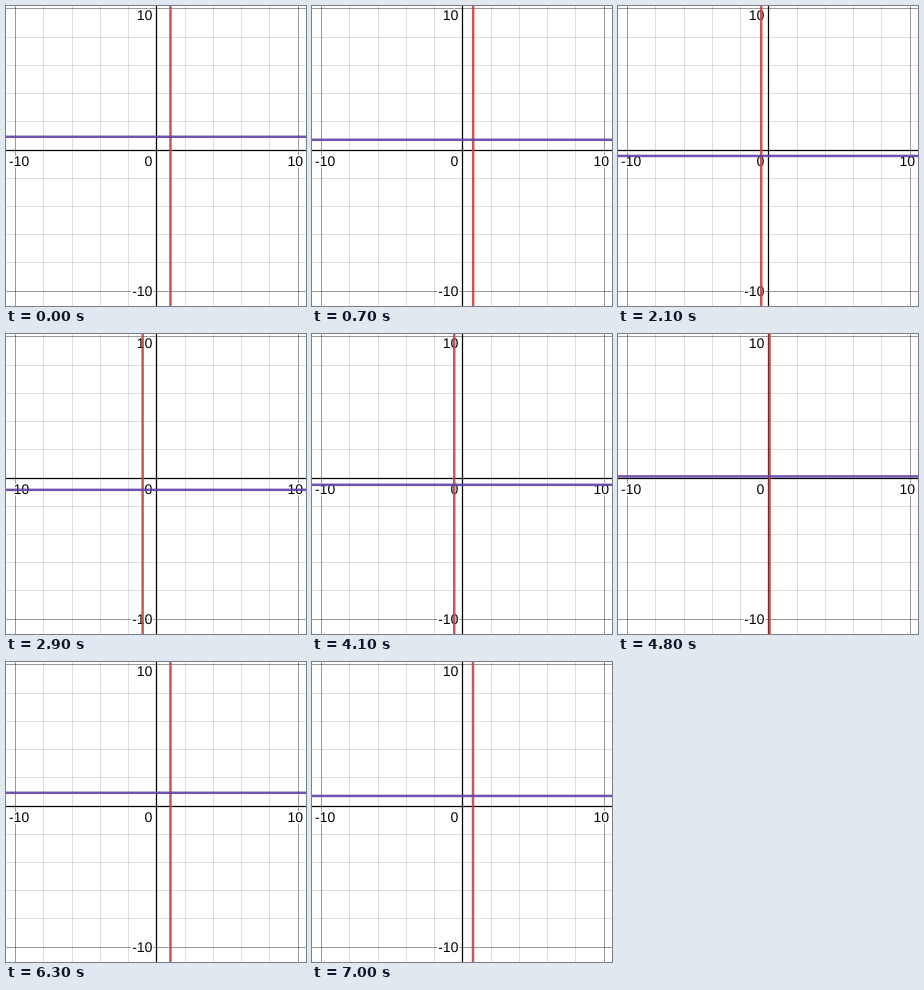
These frames come from a looping animation (300 by 300 pixels, 7100 ms). A matplotlib script:

```python
import math

import matplotlib.pyplot as plt
from matplotlib.animation import FuncAnimation
from matplotlib.patheffects import withStroke

SIZE, DPI = 300, 100
PX = 72 / DPI              # points per pixel
CX, CY, UNIT = 150.35, 143.51, 14.12
FRAMES, INTERVAL = 71, 100

fig = plt.figure(figsize=(SIZE / DPI, SIZE / DPI), dpi=DPI, facecolor="white")
ax = fig.add_axes([0, 0, 1, 1])
ax.set_xlim(0, SIZE)
ax.set_ylim(SIZE, 0)
ax.axis("off")


def rule(x=None, y=None, width=1, **style):
    """Full-length vertical (x) or horizontal (y) line in pixel coordinates."""
    xs = [x, x] if y is None else [-5, SIZE + 5]
    ys = [y, y] if x is None else [-5, SIZE + 5]
    return ax.plot(xs, ys, snap=False, lw=width * PX, **style)[0]


def label(x, baseline, text, align):
    ax.text(x, baseline, text, ha=align, va="baseline", zorder=4,
            family="Liberation Sans", fontsize=14 * PX, color="black",
            path_effects=[withStroke(linewidth=3 * PX, foreground="white")])


def crisp(v):
    """Centre of the pixel that starts nearest to v."""
    return math.floor(v + 0.5) + 0.5


# Grid every two units, stronger at the tens, black axes at zero
for n in range(-10, 11, 2):
    if n == 0:
        style = dict(color="black", width=1.25, zorder=3)
    elif abs(n) == 10:
        style = dict(color="black", alpha=0.4, zorder=2)
    else:
        style = dict(color="black", alpha=0.13, zorder=1)
    rule(x=crisp(CX + n * UNIT), **style)
    rule(y=crisp(CY - n * UNIT), **style)

label(3, 160, "-10", "left")
label(297, 160, "10", "right")
for baseline, text in [(160, "0"), (14, "10"), (290, "-10")]:
    label(146.3, baseline, text, "right")

red = rule(x=CX, color="#c74440", alpha=0.9, width=2.5, zorder=5)
purple = rule(y=CY, color="#6042a6", alpha=0.9, width=2.5, zorder=6)


def update(i):
    a = math.cos(i * INTERVAL / 1000)
    red.set_xdata([CX + a * UNIT] * 2)
    purple.set_ydata([CY - 0.9 * a * UNIT] * 2)
    return red, purple


anim = FuncAnimation(fig, update, frames=FRAMES, interval=INTERVAL,
                     repeat=True, repeat_delay=0)
plt.show()
```
